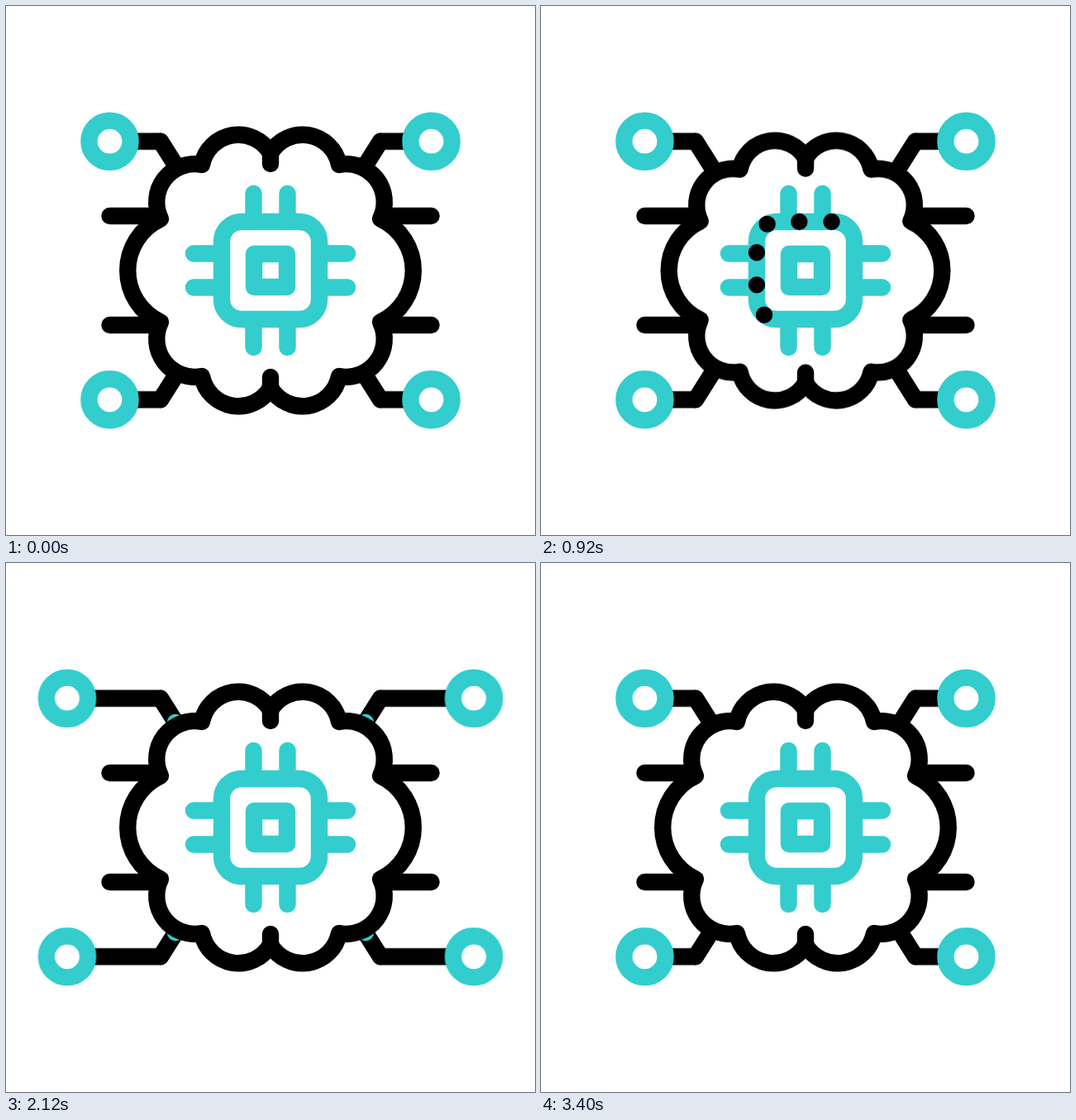
An HTML page for the animation above (3600 ms loop, 640x640 px).

```html
<!DOCTYPE html>
<html lang="en">
<head>
<meta charset="utf-8">
<title>Brain chip</title>
<style>
  html, body { margin: 0; width: 100%; height: 100%; overflow: hidden; background: #fff; }
  svg { display: block; width: 100vw; height: 100vh; }
  .ink, .teal { fill: none; stroke: #000; stroke-width: 20.4; stroke-linecap: round; stroke-linejoin: round; }
  .teal { stroke: #33cdcd; }
  .fill { fill: #fff; }
  .flat { stroke-linecap: butt; }
  .brain, .early, .late { animation: 3600ms cubic-bezier(.333, 0, .667, 1) infinite; }
  .brain { animation-name: squeeze; }
  .brain path { vector-effect: non-scaling-stroke; }
  .early { animation-name: early; }
  .late { animation-name: late; }
  .node { --out: translateX(-51.5px); }
  .wire { --out: scaleX(1.837); }

  @keyframes squeeze {
    0%, 5.556% { transform: scale(1); }
    18.14% { transform: scale(.8815); }
    30.72%, 100% { transform: scale(1); }
  }
  @keyframes early {
    0%, 30.556% { transform: none; }
    44.444%, 72.222% { transform: var(--out); }
    83.333%, 100% { transform: none; }
  }
  @keyframes late {
    0%, 30.556% { transform: none; }
    44.444%, 83.333% { transform: var(--out); }
    94.444%, 100% { transform: none; }
  }
</style>
</head>
<body>
<svg viewBox="0 0 640 640">
  <g transform="translate(320 320)">
    <path class="ink" d="M-194.5-66H-125M-194.5 66H-125M194.5-66H125M194.5 66H125"/>
    <g id="corners"></g>

    <g class="brain">
      <path class="ink fill" d="M0-142A45 45 0 0 0-83-128A46 46 0 0 0-133-62.5A69 69 0 0 0-133 62.5
        A46 46 0 0 0-83 128A45 45 0 0 0 0 142A45 45 0 0 0 83 128A46 46 0 0 0 133 62.5
        A69 69 0 0 0 133-62.5A46 46 0 0 0 83-128A45 45 0 0 0 0-142Z"/>
      <path class="ink" d="M0-142V-129M0 142V129"/>
    </g>

    <path class="teal" d="M-20.5-93V-59M20.5-93V-59M-20.5 93V59M20.5 93V59
      M-93-20.5H-59M-93 20.5H-59M93-20.5H59M93 20.5H59"/>
    <path id="chip" class="teal" d="M35-59A24 24 0 0 1 59-35V35A24 24 0 0 1 35 59H-35
      A24 24 0 0 1-59 35V-35A24 24 0 0 1-35-59Z"/>
    <rect class="teal" x="-20" y="-20" width="40" height="40"/>
    <path id="chipDots" class="ink"/>
  </g>
</svg>
<script>
  const LOOP = 3600;
  const GAP = 39.16;
  const $ = id => document.getElementById(id);

  // Each corner is the top left one, mirrored.
  const corner = (sx, sy, timing) => `
    <g transform="scale(${sx} ${sy})">
      <path class="ink flat" d="M-107-115L-133-156.3h-1"/>
      <g transform="translate(-133 -156.3)"><path class="ink flat wire ${timing}" d="M0 0H-61.5"/></g>
      <path class="teal wireDots"/>
      <circle class="teal fill node ${timing}" cx="-194.5" cy="-156.3" r="25.1"/>
    </g>`;
  $('corners').innerHTML = corner(1, 1, 'early') + corner(-1, 1, 'late') +
    corner(1, -1, 'late') + corner(-1, -1, 'early');

  const wire = document.createElementNS('http://www.w3.org/2000/svg', 'path');
  wire.setAttribute('d', 'M-115-127L-133-156.3H-246');
  const wireDots = document.querySelectorAll('.wireDots');

  const ease = (t, from, to) => {
    const p = Math.min(1, Math.max(0, (t - from) / (to - from)));
    return p * p * (3 - 2 * p);
  };

  // Evenly spaced dots on the part of a path between tail and head (0 to 1).
  const trail = (path, tail, head) => {
    if (head <= 0 || tail >= 1) return '';
    const total = path.getTotalLength();
    let d = '';
    for (let s = tail * total; s <= head * total; s += GAP) {
      const p = path.getPointAtLength(s);
      d += `M${p.x.toFixed(2)} ${p.y.toFixed(2)}h.01`;
    }
    return d;
  };

  let origin;
  function draw(now) {
    origin ??= now;
    const t = (now - origin) % LOOP;
    $('chipDots').setAttribute('d', trail($('chip'), ease(t, 500, 1300), ease(t, 200, 930)));
    const d = trail(wire, ease(t, 2200, 2600), ease(t, 2100, 2500));
    wireDots.forEach(el => el.setAttribute('d', d));
    requestAnimationFrame(draw);
  }
  requestAnimationFrame(draw);
</script>
</body>
</html>
```
